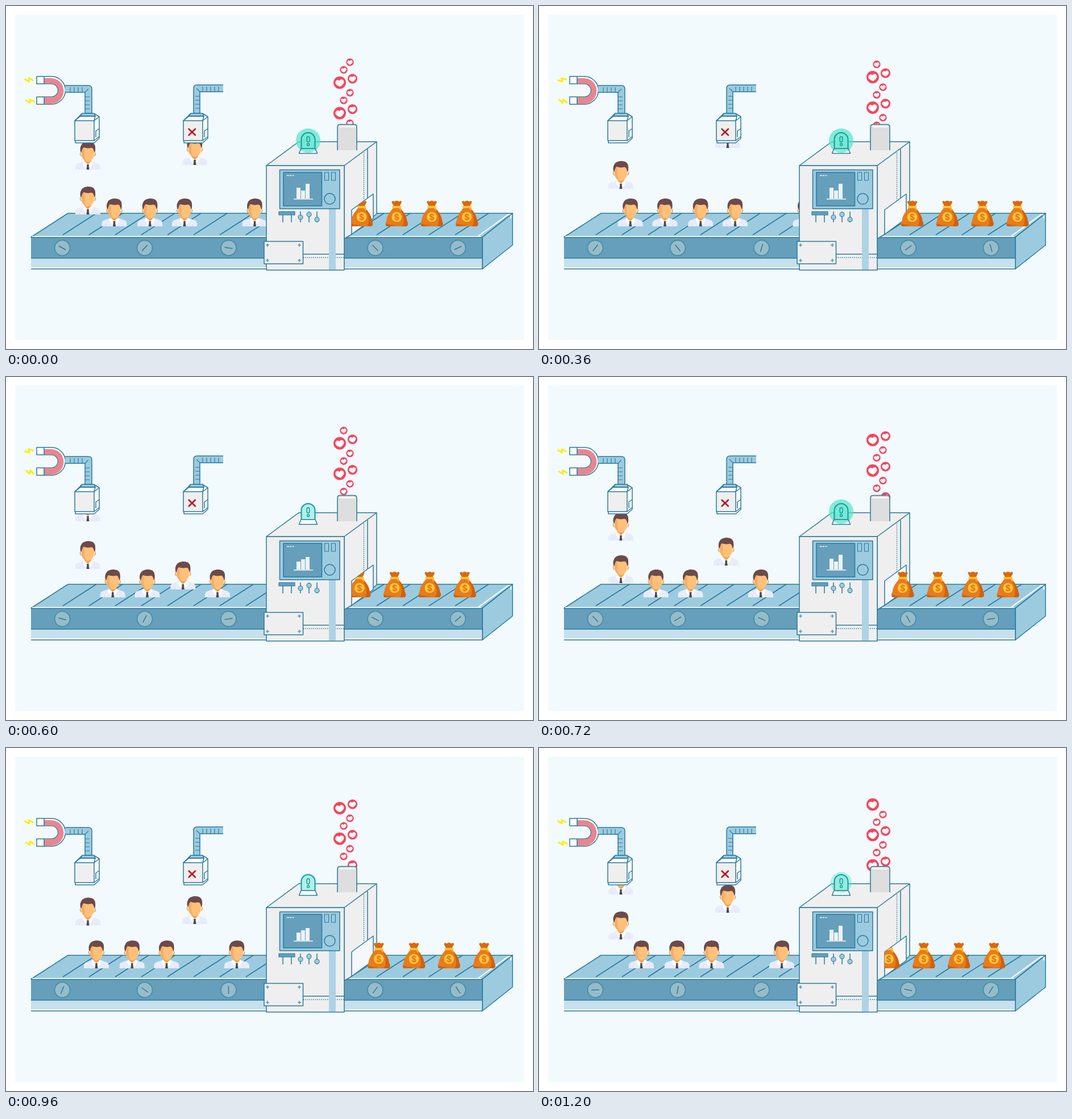
An HTML page that plays this animation: 927x604 px, repeating every 1.32 s.

```html
<!DOCTYPE html>
<html lang="en">
<head>
<meta charset="utf-8">
<title>Conveyor</title>
<style>
  html, body { margin: 0; width: 100%; height: 100%; overflow: hidden; background: #fff; }
  svg { display: block; width: 927px; height: 604px; }
  .ink { stroke: #2a7a9c; stroke-width: 1.5; stroke-linejoin: round; }
  .line { fill: none; }
  .thin { stroke-width: 1.1; }
  .dots { stroke-dasharray: 1.5 2; }
  .bare { stroke: none; }
  .shine { fill: none; stroke: #fff; stroke-width: 2; }
  .teal { stroke: #119aa3; }
  .sky { fill: #9ccbe0; }
  .deep { fill: #659fbb; }
  .pale { fill: #c6e0ed; }
  .grey { fill: #efefef; }
  .white { fill: #fdfefe; }
</style>
</head>
<body>
<svg viewBox="0 0 927 604">
  <defs>
    <clipPath id="below"><path d="M0 239H927V604H0Z"/></clipPath>
    <clipPath id="exit"><path d="M608 359L646 331V300H927V420H608Z"/></clipPath>

    <g id="person">
      <path fill="#e8ecfa" d="M-22 0V-4C-22-9-19-11-14-12L-6-15H6L14-12C19-11 22-9 22-4V0Z"/>
      <path fill="#d5dcf1" d="M-15 0V-4H-14V0ZM14 0V-4H15V0Z"/>
      <path fill="#f2a04f" d="M-6-23H6V-13L0-8L-6-13Z"/>
      <path fill="#fff" d="M-6-15L0-9L-5-4L-9-12ZM6-15L0-9L5-4L9-12Z"/>
      <path fill="#47454f" d="M-2-9H2L1.500-6L2.500 0H-2.500L-1.500-6Z"/>
      <path fill="#f2a55a" d="M-13-30q-2 0-1 4q1 3 3 3zM13-30q2 0 1 4q-1 3-3 3z"/>
      <path fill="#ffc078" d="M-11-39H11V-27C11-20 5-14 0-14S-11-20-11-27Z"/>
      <path fill="#f5ad62" d="M-11-38H-6V-27Q-6-19-2-14.300C-7-16-11-21-11-27Z"/>
      <path fill="#6c4a4b" d="M-12-29C-14-33-14-39-12-42C-10-47-5-49 1-49C9-49 13-45 13-39C13.500-35 13-32 12-29L10-35C9-38 7-39 4-38C0-37-4-38-7-39C-10-38-10-34-12-29Z"/>
    </g>

    <g id="bag">
      <path fill="#d9690f" d="M-5-35L-9-43Q-7-46-4-43.500Q0-47 4-43.500Q7-46 9-43L5-35Z"/>
      <path fill="#e87b1c" d="M-5-34H5C10-27 17-21 18-10Q22-2 17 0H-17Q-22-2-18-10C-17-21-10-27-5-34Z"/>
      <path fill="#cf620f" d="M6-33C11-26 17-20 18-10Q22-2 17 0H9Q14-6 12-16Q11-24 3-33ZM-18-5Q-10-1 0-3Q-6 0-17 0Q-21-1-18-5Z"/>
      <rect x="-8" y="-36" width="16" height="4" rx="2" fill="#ffc235"/>
      <path fill="none" stroke="#ffb72d" stroke-width="2" d="M4-33L8-28"/>
      <circle cy="-16.500" r="8.800" fill="#ffc537"/>
      <text y="-11.200" text-anchor="middle" font-family="Inter, Arial, sans-serif" font-size="14.500" font-weight="700" fill="#df7319">$</text>
    </g>

    <g id="heart">
      <circle r="1" fill="#f5455d"/>
      <path fill="#fff" transform="rotate(-8)" d="M0 .64C-.5 .42-.8 .1-.66-.22C-.5-.56-.15-.55 0-.3C.15-.55 .5-.56 .66-.22C.8 .1 .5 .42 0 .64Z"/>
    </g>

    <path id="bolt" fill="none" stroke="#fbee0c" stroke-width="3" stroke-linejoin="round" stroke-linecap="round" d="M-7-1L0 3L0-3L7 1"/>

    <g id="box" class="ink">
      <path class="white" d="M121 202L133 190H156L164 195V233L155 241H122V202Z"/>
      <path class="sky" d="M131 194L134 189H155L157 194Z"/>
      <path class="grey" d="M121 202H155V237H121Z"/>
      <path class="line" d="M155 202L164 195M155 237L164 230M121 202L131 194H157L155 202M158 231V220L164 216"/>
    </g>

    <g id="wheel">
      <circle r="13.500" fill="#97bcc8" stroke="#468fac" stroke-width="1.800"/>
      <path class="ink" d="M-7 0H7"/>
    </g>
  </defs>

  <rect x="16" y="15" width="895" height="573.500" fill="#f2fafd"/>

  <!-- conveyor -->
  <g class="ink">
    <path class="sky" d="M44 407L109 365H891L838 407Z"/>
    <path class="sky" d="M838 407L891 365V421L838 463Z"/>
    <path class="shine" d="M831 405L883 367.500H888V374"/>
    <path class="line" d="M838 407L891 365"/>
    <path id="slats" class="line"/>
    <path class="pale bare" d="M44 444H838V463H44Z"/>
    <path class="shine" d="M44 461H836M46 406H836"/>
    <path class="deep bare" d="M44 407.500H838V444H44Z"/>
    <path class="line" d="M44 407.500H838V463H44M44 444H838"/>
  </g>
  <g id="wheels"></g>
  <g id="people" clip-path="url(#below)"></g>

  <!-- magnet and feeders -->
  <g id="bolts"></g>
  <g class="ink">
    <path class="white" d="M54 124H80A24.500 24.500 0 0 1 80 173H54V160H80A11.500 11.500 0 0 0 80 137H54Z"/>
    <path class="bare" fill="#e88591" d="M67 127H79A21.500 21.500 0 0 1 79 172H67V160.500H80A12 12 0 0 0 80 136.500H67Z"/>
    <path class="line" d="M67 124V137M67 160V173"/>
    <path class="sky" d="M104 140H145Q151 140 151 146V189H139V152H104"/>
    <path class="line thin" d="M113 143V152M120 143V152M127 143V152M134 143V152M139 152L145 146M139 160H147M139 167H147M139 174H147M139 181H147"/>
    <path class="sky" d="M382 139H336Q330 139 330 145V189H341V151H382"/>
    <path class="line thin" d="M374 142V151M367 142V151M360 142V151M353 142V151M346 142V151M341 151L335 145M341 159H333M341 166H333M341 173H333M341 180H333"/>
  </g>
  <use href="#box"/>
  <use href="#box" x="191"/>
  <path d="M321.500 216.500L333 227.500M333 216.500L321.500 227.500" stroke="#b5121f" stroke-width="2.500" stroke-linecap="round"/>

  <!-- machine -->
  <g class="ink">
    <path class="grey" d="M458 281L515 239H652V366L608 402L595 410V281Z"/>
    <path class="line" d="M652 239L595 281M636 252V338"/>
    <path class="line dots" d="M629.500 258V343"/>
    <path fill="#f4f8fa" d="M608 359L646 331V374L608 402Z"/>
    <path class="grey" d="M458 281H595V465H458Z"/>
    <path class="line" d="M523 437H595"/>
    <path class="line dots" d="M523 443H595"/>
    <path class="bare" fill="#aed3e5" d="M568 357H580V464H568Z"/>
    <path class="sky" d="M481.500 288.500H587V357H481.500Z"/>
    <path class="deep" d="M488 293H555.500V352H488Z"/>
    <path class="line thin" d="M560.500 293H567.500V307H560.500ZM572.500 293H579.500V307H572.500Z"/>
    <circle class="line" cx="569.500" cy="339.500" r="9.500"/>
    <path class="deep thin" d="M480 362H508V368H480Z"/>
    <path class="line" d="M487 368V381M502 368V381M518 362V381M533 362V381M547 362V381"/>
    <g class="sky thin"><circle cx="518" cy="372" r="4"/><circle cx="533" cy="367" r="4"/><circle cx="547" cy="376" r="4"/></g>
    <path class="grey" d="M454 414.500H522.500V454H454Z"/>
    <path class="line thin" d="M457 421h6m-3-3v6M513 421h6m-3-3v6M457 448h6m-3-3v6M513 448h6m-3-3v6"/>
  </g>
  <path stroke="#f2f6f8" stroke-width="1.500" d="M494 298.500H498M499 298.500H502M503.500 298.500H506.500M506 340H540"/>
  <path id="bars" fill="#edf2f4"/>

  <g id="hearts"></g>
  <path class="ink" fill="#dedede" d="M583 254V213Q583 208.500 588 208.500H612Q617 208.500 617 213V254"/>
  <path class="shine" d="M586 212.500H614"/>

  <!-- alarm -->
  <path class="white" d="M515.500 259.500L519 251H544L547.500 259.500Z"/>
  <path fill="#c3f1ec" d="M519.500 251V235A12 12 0 0 1 543.500 235V251Z"/>
  <circle id="glow" cx="531.500" cy="237" fill="#54e6c8"/>
  <g class="line">
    <path class="ink" d="M515.500 259.500L519 251H544L547.500 259.500Z"/>
    <path class="teal" stroke-width="2" d="M519.500 251V235A12 12 0 0 1 543.500 235V251"/>
    <rect class="teal" x="529.300" y="230" width="4.600" height="9.500" rx="2.300" stroke-width="1.500"/>
    <circle class="teal" cx="531.600" cy="244" r="2" stroke-width="1.500"/>
  </g>

  <g id="bags" clip-path="url(#exit)"></g>
</svg>

<script>
const STEP = 120, LOOP = 11, TRAVEL = 123.5, GAP = TRAVEL / 2;
const $ = id => document.getElementById(id);
const use = (id, x, y, more = '') =>
  `<use href="#${id}" transform="translate(${x} ${y}) ${more}"/>`;

// Straight moves between [time, value] points
function path(points, t) {
  const i = points.findIndex(p => p[0] > t);
  if (i < 0) return points[points.length - 1][1];
  if (i === 0) return points[0][1];
  const [[a, from], [b, to]] = points.slice(i - 1, i + 1);
  return from + (to - from) * (t - a) / (b - a);
}

// Distance the belt has run; it also drives the bags and the hearts
const run = [[0, 0], [2, 13], [3, 31], [5, 58], [6, 76], [8, 92], [LOOP, TRAVEL]];
const belt = t => {
  const lap = Math.floor(t / LOOP);
  return lap * TRAVEL + path(run, t - lap * LOOP);
};

// One worker rides into the machine, the next is sucked up on the way
const rider = {
  start: -1, end: 38,
  x: t => Math.max(144, 67 + belt(t)),
  y: t => path([[-1, 258], [0, 288], [3, 322], [5, 338], [7, 388]], t)
};
const reject = {
  start: 5, end: 37,
  x: t => Math.min(332, Math.max(144, 67 - GAP + 1 + belt(t))),
  y: t => t < 20
    ? path([[5, 254], [6, 288], [10, 337], [11, 367], [12, 388]], t)
    : path([[26, 388], [27, 374], [28, 332], [30, 310], [37, 240]], t)
};

function drawPeople(s) {
  let out = '';
  for (const who of [rider, reject])
    for (let t = s - LOOP; t < who.end; t += LOOP)
      if (t >= who.start) out += use('person', who.x(t), who.y(t));
  $('people').innerHTML = out;
}

function drawBags(s) {
  let out = '';
  for (let x = 625.5 + belt(s) - TRAVEL; x < 853; x += GAP)
    if (x > 603) out += use('bag', x, 388);
  $('bags').innerHTML = out;
}

const wheels = [[99, 30], [244, 133], [391.5, 8], [649.5, 45], [795, 155]];
function drawWheels(s) {
  $('wheels').innerHTML = wheels.map(([x, angle]) =>
    use('wheel', x, 426, `rotate(${angle + 360 * s / LOOP})`)).join('');
}

const bubbles = [[605, 99, 6.7], [594, 112.5, 6.7], [609.5, 128, 8.6], [587, 135, 11]];
function drawHearts(s) {
  let out = '';
  for (const [x, top, r] of bubbles)
    for (let y = top - belt(s) * .315; y < 212; y += 53.7)
      if (y > 93) out += use('heart', x, y, `scale(${r})`);
  $('hearts').innerHTML = out;
}

function drawLights(s) {
  const lit = 1 - s % 3 / 2;
  $('glow').setAttribute('r', 16 + 5.5 * lit);
  $('glow').setAttribute('opacity', .15 + .55 * lit);
  const tops = lit ? [320, 325, 313] : [325, 321, 317];
  $('bars').setAttribute('d', tops.map((y, i) => `M${511 + 8 * i} ${y}h7V339h-7Z`).join(''));

  const lean = s > 2 && s < 6;
  $('bolts').innerHTML = use('bolt', 40.5, 130, `rotate(${lean ? -14 : 0})`) +
    use('bolt', 42, 167.5, `rotate(${lean ? 14 : 0})`);
}

function draw(s) {
  drawPeople(s);
  drawBags(s);
  drawWheels(s);
  drawHearts(s);
  drawLights(s);
}

$('slats').setAttribute('d',
  Array.from({ length: 16 }, (_, i) => `M${159 + 46 * i} 365l-59 38`).join(''));

let shown = -1;
function tick(now) {
  const s = Math.floor(now / STEP) % LOOP;
  if (s !== shown) draw(shown = s);
  requestAnimationFrame(tick);
}
draw(0);
requestAnimationFrame(tick);
</script>
</body>
</html>
```
